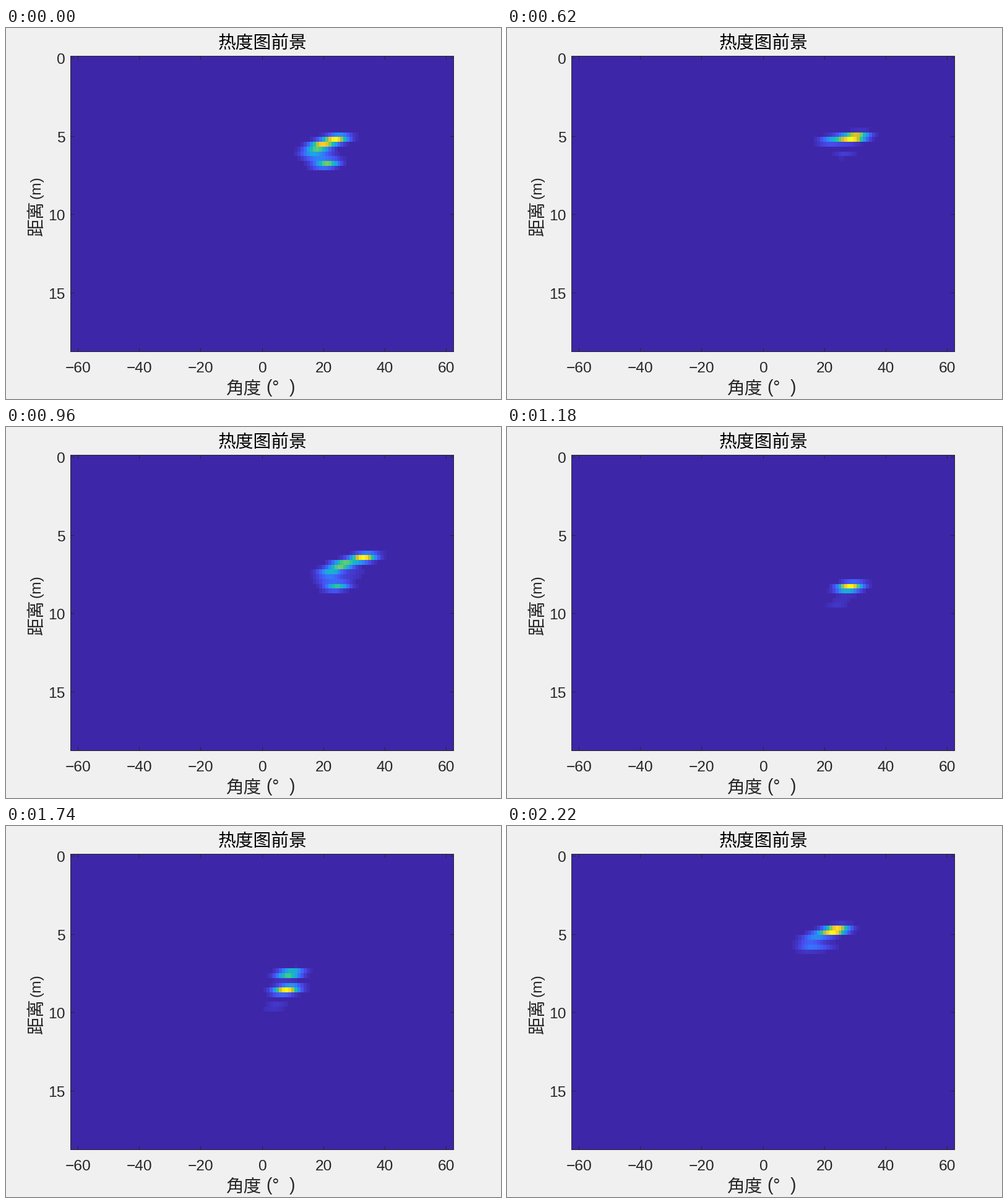
Recreate the animation shown at these times as a matplotlib script. Size 800x600 px, loop 2.24 s.

```python
import numpy as np
import matplotlib.pyplot as plt
from matplotlib.animation import FuncAnimation
from matplotlib.colors import LinearSegmentedColormap

W, H, DPI = 800, 600, 100
FRAMES, STEP_MS = 112, 20
LEFT, RIGHT, TOP, BOTTOM = 104, 724, 45, 524
DARK = (0.15, 0.15, 0.15)
CJK, LATIN = "Noto Sans CJK JP", "Liberation Sans"

ANGLES = np.arange(-62, 63)
ROWS = np.arange(62)[:, None]
SX, SY = 2.6, 0.6  # spread of one echo in degrees and rows
LEAN = 1.2         # degrees an echo slants to the left per row
BOW = 1.1          # bulge of the trail per row of its length
FLOOR = 0.02       # weaker values fall to the background

HEAT = LinearSegmentedColormap.from_list("heat", [
    "#3e26a8", "#484df0", "#327cfc", "#20a5e2", "#12beb9",
    "#5ccd76", "#c8c129", "#fec934", "#f9fb15"])

# Key points: frame, lead angle and row, offset to the trail's end,
# strength of that end, strength of the trail between.
KEYS = np.array([
    (0, 24, 16.9, -3, 5.2, .6, 1),
    (31, 30, 16.55, -8, .6, .22, .3),
    (48, 33, 21, -8.5, 6, .5, 1),
    (59, 28.2, 27.1, 0, 1, .1, 0),
    (74, 16, 30.25, 3, -1.2, .25, 0),
    (87, 8, 27.9, 1, -3.3, .7, 0),
    (96, 5, 23.5, 0, -2, .4, .1),
    (108, 15, 16.5, -5, 2, .2, .2),
    (111, 23.5, 15.5, -8, 3.5, .15, .3)])
FLICKER = np.random.default_rng(4).uniform(.85, 1.15, FRAMES)


def echo(angle, row, amp):
    dr = ROWS - row
    da = ANGLES - angle + LEAN * dr
    return amp * np.exp(-(da / SX) ** 2 / 2 - (dr / SY) ** 2 / 2)


def heat(frame):
    angle, row, da, dr, end, body = (
        np.interp(frame, KEYS[:, 0], col) for col in KEYS[:, 1:].T)
    glow = FLICKER[frame]
    field = echo(angle, row, 1) + echo(angle + da, row + dr, end * glow)
    # The trail bulges to the left and halves in strength at each step.
    for u in (.25, .5, .75):
        bulge = BOW * abs(dr) * np.sin(np.pi * u)
        field += echo(angle + da * u - bulge, row + dr * u,
                      1.5 * body * glow * 2 ** (-4 * u))
    field += echo(angle - 3.5, row + 3.5, .07 * glow)  # faint ghost behind
    field /= field.max()
    field[field < FLOOR] = 0
    return field


fig = plt.figure(figsize=(W / DPI, H / DPI), dpi=DPI, facecolor="#f0f0f0")
ax = fig.add_axes([0, 0, 1, 1])
image = ax.imshow(heat(0), cmap=HEAT, vmin=0, vmax=1, aspect="auto",
                  interpolation="nearest", extent=(LEFT, RIGHT, BOTTOM, TOP))
ax.set(xlim=(0, W), ylim=(H, 0))
ax.axis("off")


def line(xs, ys):
    ax.plot(xs, ys, color=DARK, lw=72 / DPI, snap=False,
            solid_capstyle="butt", solid_joinstyle="miter")


def label(x, y, text, size, font=LATIN, color=DARK, **kw):
    ax.text(x, y, text, fontsize=size * 72 / DPI, family=font, color=color,
            va="baseline", **kw)


# Lines run through pixel centres so that they stay one pixel wide.
x0, x1, y0, y1 = LEFT + .5, RIGHT - .5, TOP + .5, BOTTOM - .5
line([x0, x1, x1, x0, x0], [y0, y0, y1, y1, y0])
TICK = 6
for deg in range(-60, 61, 20):
    x = np.floor(414 + 4.952 * deg) + .5
    line([x, x], [y1, y1 - TICK])
    line([x, x], [y0, y0 + TICK])
    label(x, 557, str(deg).replace("-", "\u2212"), 24.5, ha="center")
for metres in range(0, 16, 5):
    y = np.floor(48.9 + 25.3 * metres) + .5
    line([x0, x0 + TICK], [y, y])
    line([x1, x1 - TICK], [y, y])
    label(95.5, y + 9.3, str(metres), 24.5, ha="right")

label(414.5, 33, "热度图前景", 28.8, CJK, "black", ha="center")
label(355.5, 593, "角度", 28.6, CJK)
for x, mark in ((424.5, "("), (435, "°"), (463, ")")):
    label(x, 590, mark, 28.6, ha="center")
upright = dict(rotation=90, rotation_mode="anchor")
label(58, 336.5, "距离", 28.6, CJK, **upright)
label(55.5, 275.5, "(m)", 24.5, **upright)


def draw(frame):
    image.set_data(heat(frame))
    return (image,)


anim = FuncAnimation(fig, draw, frames=FRAMES, interval=STEP_MS,
                     repeat=True, repeat_delay=0, blit=False)
plt.show()
```
